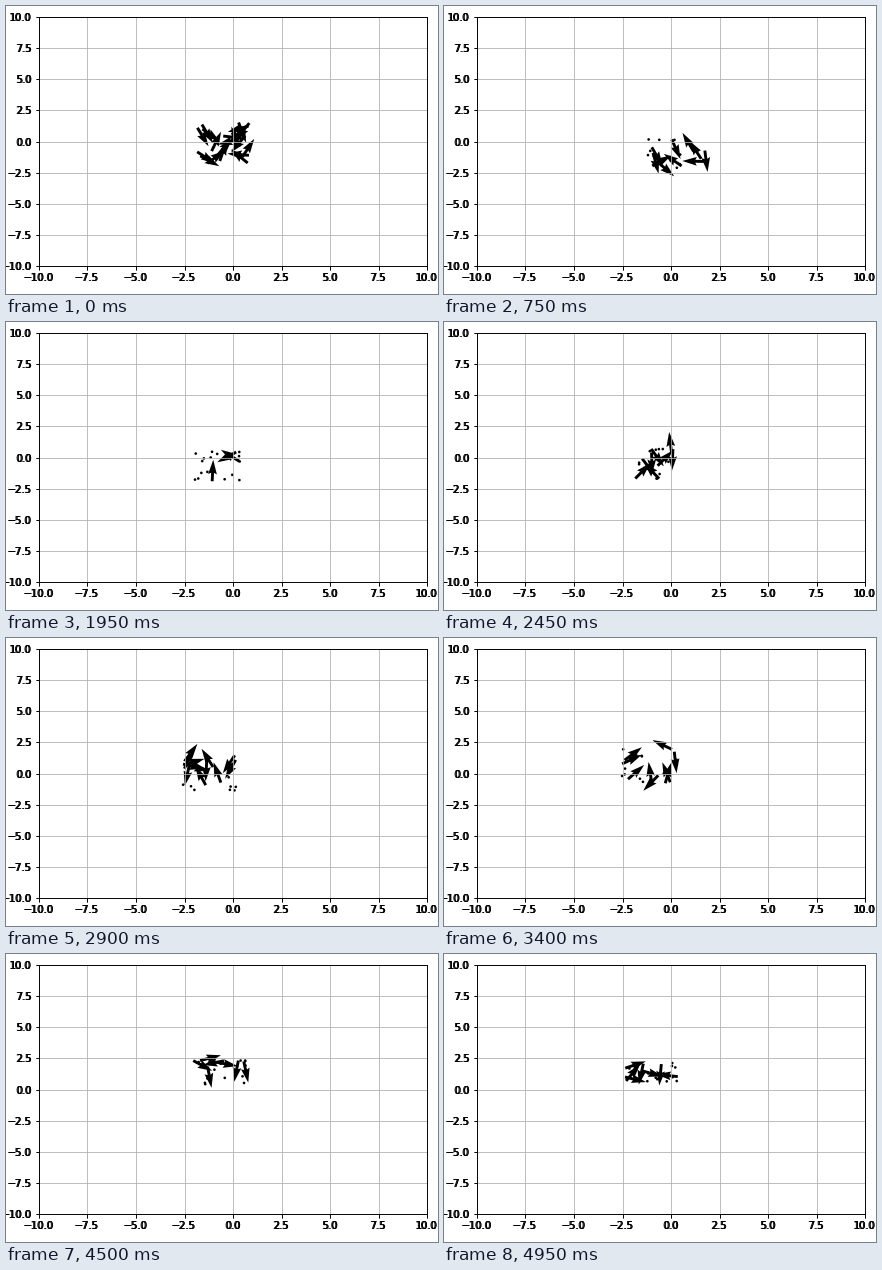
Recreate the animation shown at these times as a matplotlib script. Size 432 by 288 pixels, loop 5000 ms.

```python
import numpy as np
import matplotlib.pyplot as plt
from matplotlib.animation import FuncAnimation

W, H, DPI = 432, 288, 72
LEFT, TOP, WIDTH, HEIGHT = 33, 11, 388, 249    # plot area in pixels
AGENTS, FRAMES = 20, 100
HOLD = 3        # frames an agent keeps one state
rng = np.random.default_rng(12)

# Drift of the swarm: frame, center x and y, spread in x and y.
DRIFT = np.array([
    (0, -0.5, -0.1, 0.9, 1.1),
    (15, 0.3, -1.0, 1.0, 0.8),
    (28, -0.9, -1.0, 0.9, 0.8),
    (49, -0.8, -0.5, 0.7, 0.8),
    (62, -1.4, 0.3, 1.0, 1.0),
    (81, -0.5, 1.3, 0.8, 0.8),
    (99, -0.9, 1.4, 1.0, 0.5),
])

blocks = FRAMES // HOLD + 1
share = 0.4 + 0.6 * np.exp(-np.arange(blocks) / 3)
moving = rng.random((blocks, AGENTS)) < share[:, None]
turn = rng.normal(0, 0.8, (blocks, AGENTS))
phase = rng.uniform(0, 2 * np.pi, (2, AGENTS))
rate = rng.uniform(0.1, 0.35, (2, AGENTS))


def swarm(i):
    """Positions and arrow vectors: agents roam, and some head for the center."""
    cx, cy, sx, sy = (np.interp(i, DRIFT[:, 0], col) for col in DRIFT[:, 1:].T)
    wave_x, wave_y = np.sin(rate * i + phase)
    dx, dy = 1.5 * sx * wave_x, 1.5 * sy * wave_y
    block = i // HOLD
    heading = np.arctan2(-dy, -dx) + turn[block]
    on = moving[block]
    return cx + dx, cy + dy, np.cos(heading) * on, np.sin(heading) * on


def add_axes(name, shift=0):
    box = [(LEFT + shift) / W, 1 - (TOP + HEIGHT) / H, WIDTH / W, HEIGHT / H]
    ax = fig.add_axes(box, label=name)
    ticks = np.arange(-10, 10.1, 2.5)
    ax.set(xlim=(-10, 10), ylim=(-10, 10), xticks=ticks, yticks=ticks)
    return ax


fig = plt.figure(figsize=(W / DPI, H / DPI), dpi=DPI, facecolor="white")
ax = add_axes("field")
ax.grid(True)

# Repeated axes give the heavy frame and the bold labels.
add_axes("frame").patch.set_visible(False)
bold = add_axes("labels", shift=-1)
bold.patch.set_visible(False)
bold.spines[:].set_visible(False)
bold.tick_params(color="none")

# The grid lines run over the arrows.
arrows = ax.quiver(*swarm(0), scale=18, width=0.0075, color="black", zorder=1)


def draw(i):
    x, y, u, v = swarm(i)
    arrows.set_offsets(np.column_stack([x, y]))
    arrows.set_UVC(u, v)
    return arrows,


anim = FuncAnimation(fig, draw, frames=FRAMES, interval=50, repeat=True,
                     repeat_delay=0, blit=False)
plt.show()
```
